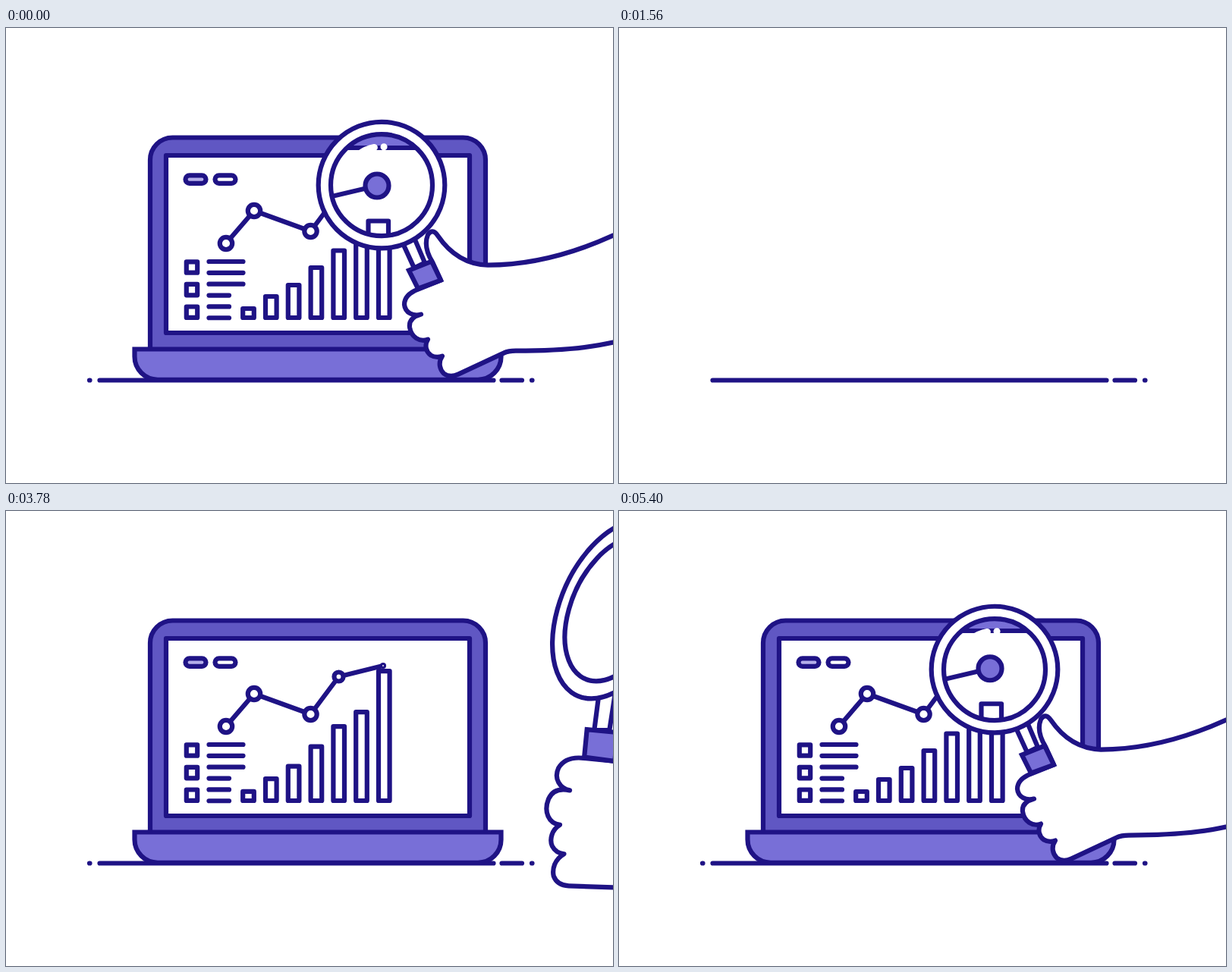
Animation, 800 px wide and 600 px high, one loop 5.43 s. Source, as an HTML page:

```html
<!DOCTYPE html>
<html lang="en">
<head>
<meta charset="utf-8">
<title>Chart under a magnifier</title>
<style>
  html, body { margin: 0; width: 100%; height: 100%; overflow: hidden; background: #fff; }
  #stage { position: relative; width: 800px; height: 600px; overflow: hidden; }
  #laptop, svg { position: absolute; left: 0; top: 0; width: 800px; height: 600px; }
  /* everything below the ground line stays hidden */
  #laptop { clip-path: inset(0 0 133px 0); }
  #lid { transform-origin: 411px 423px; }
  svg { fill: #fff; stroke: #1f1385; stroke-width: 6.2; stroke-linejoin: round; stroke-linecap: round; }
  .fixed, .fixed * { vector-effect: non-scaling-stroke; }
  .mid { fill: #6057c3; }
  .light { fill: #786fd7; }
  .none { fill: none; }
  .sharp { stroke-linejoin: miter; }
  .shine { fill: none; stroke: #fff; stroke-width: 9; }
</style>
</head>
<body>
<div id="stage">
  <svg id="ground" viewBox="0 0 800 600">
    <path class="none" d="M110 464.5h.5M123.5 464.5H642.5M653.5 464.5H680M693 464.5h.5"/>
  </svg>

  <div id="laptop">
    <svg id="lid" viewBox="0 0 800 600">
      <path class="mid" d="M190 424V174A29.500 29.500 0 0 1 219.500 144.500H602.500A29.500 29.500 0 0 1 632 174V424Z"/>
      <rect x="211" y="168" width="400" height="234"/>
      <g id="chart"></g>
    </svg>
    <svg id="base" viewBox="0 0 800 600">
      <path class="light sharp" d="M169.500 423.500H652.500V433A30.500 30.500 0 0 1 622 463.800H200A30.500 30.500 0 0 1 169.500 433Z"/>
    </svg>
  </div>

  <svg viewBox="0 0 800 600">
    <clipPath id="glass"><circle class="lens" r="67"/></clipPath>
    <g id="hand" class="fixed">
      <g transform="translate(-495 -226.500)">
        <path d="M516 288L538 336L552 329L532 282Z"/>
        <path d="M1150 130C1010 200 900 258 800 293C745 318 690 332 635 332
          C605 331 584 315 569 293Q562 283 556 292C552 302 554 315 562 328L573 352L543 364
          C530 369 525 376 525 384C526 395 537 400 547 397C536 400 531 406 532 414
          C534 427 545 434 556 430C551 438 554 447 560 451Q567 455 575 452
          C569 461 572 470 577 475Q585 481 596 476L656 448Q662 445 672 445
          C725 445 765 442 800 434C920 410 1040 380 1150 340Z"/>
        <path class="light sharp" d="M531 339L561 327L573 352L543 363Z"/>
      </g>
    </g>
    <g class="lens fixed"><circle r="83.300"/></g>
    <g clip-path="url(#glass)">
      <path class="light" d="M380 118H640V158H380Z"/>
      <g id="spot">
        <path class="none" d="M400 225L489 204"/>
        <rect x="477.500" y="250.500" width="26.500" height="200"/>
        <circle class="light" cx="489" cy="204" r="15.500"/>
      </g>
    </g>
    <g class="lens fixed">
      <path class="shine" d="M-44.600 -23.700A50.500 50.500 0 0 1 -9.600 -49.600M3 -50.400h.1"/>
      <circle class="none" r="67"/>
    </g>
  </svg>
</div>

<script>
const LOOP = 5430;
const $ = id => document.getElementById(id);
const chart = $('chart');
const lenses = document.querySelectorAll('.lens');

const ramp = (t, from, to) => Math.min(1, Math.max(0, (t - from) / (to - from)));
const smooth = u => u * u * (3 - 2 * u);
const overshoot = u => 1 + 3 * (u - 1) ** 3 + 2 * (u - 1) ** 2;
const show = (el, on) => el.setAttribute('visibility', on ? 'visible' : 'hidden');

function add(tag, attrs) {
  const el = document.createElementNS('http://www.w3.org/2000/svg', tag);
  for (const k in attrs) el.setAttribute(k, attrs[k]);
  chart.append(el);
  return el;
}

// each part of the chart redraws itself from its own progress 0..1
const parts = [];
function part(el, start, length, draw) {
  parts.push(t => {
    const u = t < 2000 ? 1 : ramp(t, start, start + length);
    show(el, u > 0);
    draw(u);
  });
}

function pop(tag, attrs, x, y, start) {
  const el = add(tag, { class: 'fixed', ...attrs });
  part(el, start, 300, u =>
    el.setAttribute('transform', `translate(${x} ${y}) scale(${.1 + .9 * smooth(u)})`));
}

function trace(d, start, length) {
  const el = add('path', { d, class: 'none', pathLength: 1 });
  part(el, start, length, u => el.setAttribute('stroke-dasharray', u < 1 ? `${u} 2` : 'none'));
}

for (let i = 0; i < 2; i++)
  pop('rect', { x: -13.5, y: -5.3, width: 27, height: 10.6, rx: 5.3, fill: i ? '#fff' : '#b5afea' },
    250 + 39 * i, 199.6, 2820 + 80 * i);

for (let i = 0; i < 3; i++)
  pop('rect', { x: -7.2, y: -7.2, width: 14.4, height: 14.4 }, 245, 315.5 + 29.6 * i, 2640);

for (let i = 0; i < 6; i++)
  trace(`M267.5 ${308 + 14.85 * i}H${i < 3 ? 312.5 : 294}`, 2780 + 60 * i, 260);

[12, 28, 43, 66, 88.5, 104, 151].forEach((height, i) => {
  const bar = add('rect', { x: 312.2 + 29.8 * i, width: 14.6 });
  part(bar, 3260 + 35 * i, 560, u => {
    const h = Math.max(0, height * overshoot(u));
    bar.setAttribute('y', 382 - h);
    bar.setAttribute('height', h);
  });
});

const points = [[290, 284], [327, 241], [401.5, 268], [438.5, 218.5], [497, 204]];
trace('M' + points.join('L'), 3110, 650);
points.forEach(([x, y], i) => pop('circle', { r: 8.2 }, x, y, 3085 + 168 * i));

function drawGround(t) {
  const left = t < 2075 ? 104 + 596 * smooth(ramp(t, 1518, 2020)) : 104;
  const right = t < 2075 ? 700 : 104 + 596 * ramp(t, 2130, 3020) ** 1.3;
  $('ground').style.clipPath = `inset(0 ${800 - right}px 0 ${left}px)`;
}

function drawLaptop(t) {
  const closing = t < 2000;
  const angle = 90 * (closing ? ramp(t, 400, 1260) ** 2 : 1 - smooth(ramp(t, 2400, 2850)));
  // sinks into the ground, later hops out of it and lands
  const drop = closing
    ? 50 * ramp(t, 1230, 1530) ** 2
    : 50 - 117 * Math.sin(Math.PI / 2 * ramp(t, 2400, 2870)) + 67 * ramp(t, 2870, 3120) ** 2;
  const squeeze = closing ? 1 - .0022 * angle : 1;
  $('lid').style.transform = `translateY(${drop}px) perspective(4000px) rotateX(${-angle}deg)`;
  $('base').style.transform = `translateY(${drop}px)`;
  chart.setAttribute('transform', `translate(0 ${423 * (1 - squeeze)}) scale(1 ${squeeze})`);
  parts.forEach(draw => draw(t));
}

function drawHand(t) {
  // the hand's visit runs across the loop's end
  const s = t < 2000 ? t + LOOP : t;
  const arrive = (1 - ramp(s, 3600, 4020)) ** 2;
  const leave = ramp(s, 5910, 6570);
  const sink = 80 * (1 - ramp(s, 3960, 4860)) ** 1.9;
  const lift = 58 * smooth(ramp(s, 4860, 6180));
  const swing = Math.min(1, 3.05 * arrive);
  const lean = Math.min(1, swing + 2.2 * leave ** 3);

  const x = 495 + 955 * arrive + 555 * leave ** 3;
  const y = 230.3 - sink - lift - 145 * leave ** 2 + 59 * swing - 21 * swing * 0 - 59 * swing - 21 * swing;
  const place = `translate(${x} ${y})`;
  $('hand').setAttribute('transform',
    `${place} rotate(${30 * lean}) scale(${1 + .25 * lean} ${1 + .4 * lean})`);
  lenses.forEach(el => el.setAttribute('transform',
    `${place} skewX(${-15.7 * lean}) scale(${1 - .07 * lean} ${1 + .42 * lean})`));
  $('spot').setAttribute('transform', `translate(0 ${8 * smooth(ramp(s, 4680, 6180))})`);
}

function frame() {
  const t = performance.now() % LOOP;
  drawGround(t);
  drawLaptop(t);
  drawHand(t);
  requestAnimationFrame(frame);
}
frame();
</script>
</body>
</html>
```
